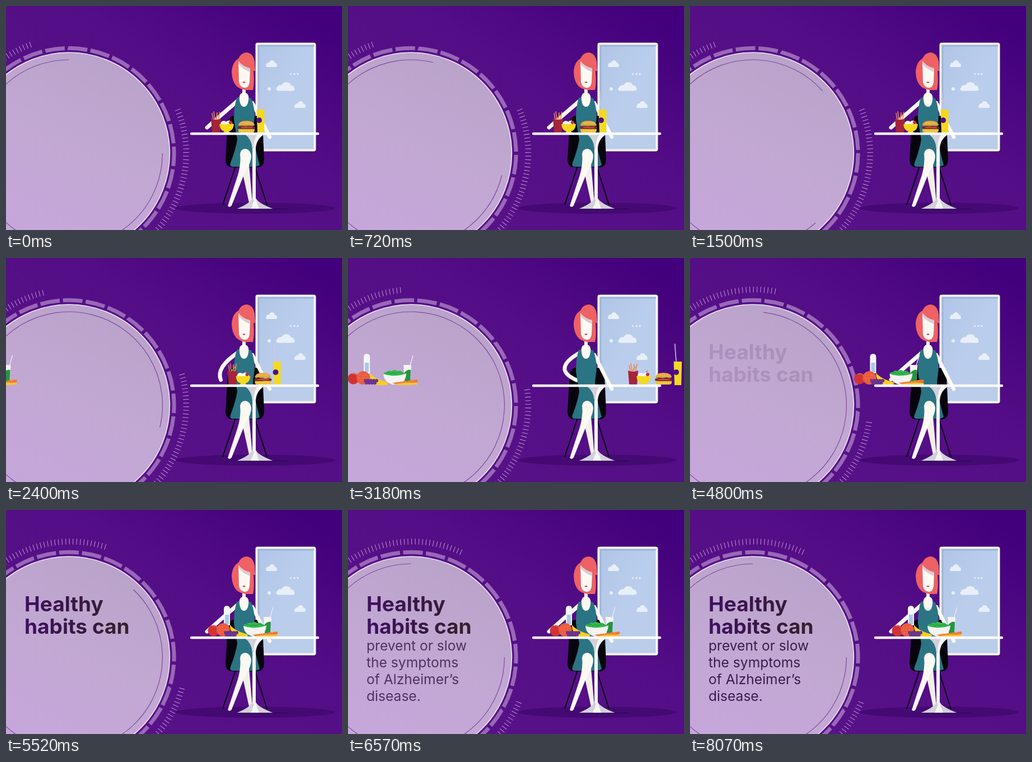
Recreate the animation shown at these times as an HTML page. Size 600 px wide and 400 px high, loop 8.1 s.

```html
<!DOCTYPE html>
<html lang="en">
<head>
<meta charset="utf-8">
<title>Healthy habits</title>
<style>
html, body { margin: 0; width: 100%; height: 100%; overflow: hidden; background: #541087; }
svg { display: block; width: 600px; height: 400px; }
text { font-family: Inter, "Open Sans", sans-serif; }
.title { font-weight: 700; font-size: 37.1px; }
.body { font-size: 24.6px; fill: #3c1c4f; }
</style>
</head>
<body>
<svg viewBox="0 0 600 400">
  <defs>
    <linearGradient id="bg" gradientUnits="userSpaceOnUse" x1="250" y1="400" x2="520" y2="0">
      <stop offset="0" stop-color="#581288"/><stop offset=".55" stop-color="#530d86"/><stop offset="1" stop-color="#43007c"/>
    </linearGradient>
    <linearGradient id="disc" x1=".3" y1="1" x2=".75" y2="0">
      <stop offset="0" stop-color="#c7a6dc"/><stop offset=".55" stop-color="#c1a8d2"/><stop offset="1" stop-color="#b9a2ca"/>
    </linearGradient>
    <linearGradient id="sky" x1="0" y1="0" x2="1" y2="1">
      <stop offset="0" stop-color="#b0c5e6"/><stop offset=".5" stop-color="#bacdec"/><stop offset="1" stop-color="#bacee9"/>
    </linearGradient>
    <linearGradient id="ink" gradientUnits="userSpaceOnUse" x1="34" y1="0" x2="218" y2="0">
      <stop offset="0" stop-color="#401062"/><stop offset=".5" stop-color="#381743"/><stop offset="1" stop-color="#35212b"/>
    </linearGradient>
    <g id="cloud" fill="#e9eff9">
      <circle cx="-5" cy="1" r="4"/><circle cx="1" cy="-2" r="5"/><circle cx="6" cy="1" r="3.5"/>
      <rect x="-10" y="0" width="20" height="5" rx="2.5"/>
    </g>
  </defs>

  <rect width="600" height="400" fill="url(#bg)"/>

  <g transform="translate(112.4 263)" fill="none">
    <circle r="180" fill="url(#disc)" stroke="#f1e6f7" stroke-width="1.6"/>
    <path id="arc" d="M167 0A167 167 0 1 1 0 -167" stroke="#814b9d" stroke-width="1.2"/>
    <circle id="dashes" r="187.700" stroke="#9868b7" stroke-width="7" pathLength="29" stroke-dasharray=".86 .14"/>
  </g>
  <g transform="translate(115 263)">
    <path id="ticks" stroke="#b58bcf" stroke-width="1.1"/>
  </g>

  <g fill="url(#ink)" id="title" class="title">
    <text x="33" y="180.500">Healthy</text><text x="33" y="220.500">habits can</text>
  </g>
  <g id="body" class="body">
    <text x="33" y="251">prevent or slow</text><text x="33" y="281">the symptoms</text>
    <text x="33" y="311">of Alzheimer’s</text><text x="33" y="341">disease.</text>
  </g>

  <ellipse cx="445" cy="361" rx="142" ry="10" fill="#440973"/>
  <path d="M413 362.500H502" stroke="#2c0550"/>

  <g id="window">
    <rect x="447.500" y="67.500" width="104" height="190" rx="2" fill="url(#sky)" stroke="#f5f5fa" stroke-width="4"/>
    <path d="M451 256V71H550" fill="none" stroke="#9db6da" stroke-width="3"/>
    <use href="#cloud" x="474" y="104"/>
    <use href="#cloud" transform="translate(499 145) scale(1.65 1.300)"/>
    <use href="#cloud" x="525" y="177"/>
    <g fill="#e9eff9">
      <circle cx="508.500" cy="121.500" r="1.500"/><circle cx="515" cy="121.500" r="1.700"/><circle cx="521" cy="121.500" r="1.700"/>
      <circle cx="470" cy="148" r="3"/>
    </g>
  </g>

  <g id="chair" fill="#08040d">
    <path d="M406 196H447Q456 197 458 207L461 273Q461 287 450 288H404Q392 288 392 274L396 207Q398 197 406 196Z"/>
    <path d="M410 286L387 355M444 286L466 355" stroke="#08040d" stroke-width="2"/>
  </g>

  <g id="woman">
    <path d="M440 173L471 234" stroke="#fcf9f3" stroke-width="6.500" stroke-linecap="round"/>
    <path id="arm" fill="none" stroke="#fcf9f3" stroke-width="7" stroke-linecap="round"/>
    <path d="M412 164Q425 160 438 165Q446 186 443 206Q440 222 442 234Q447 264 453 284Q447 288 438 287H404Q399 286 401 280Q410 257 413 238Q409 217 407 202Q407 180 412 164Z" fill="#2b7483"/>
    <path d="M422 138H428V155Q436 158 432 173Q430 180 425 180Q420 180 418 173Q414 158 422 155Z" fill="#fcf9f3"/>
    <path d="M422 296L433 272L440 351Q438 355 434 351Z" fill="#f4efe8"/>
    <path d="M418 264Q419 255 428 255Q437 257 438 268Q437 280 431 289Q425 300 421 311L403 356Q400 361 396 357L414 302Q420 281 418 264Z" fill="#fcf9f3"/>
    <path d="M415 94Q420 83 430 83Q441 84 444 99L445 116H442Q444 139 441 150H428Q420 149 414 145Q403 136 403 116Q405 99 415 94Z" fill="#ee6164"/>
    <path d="M415 99Q424 109 436 112L435 136Q434 146 426 146Q418 145 416 136Z" fill="#fcf9f3"/>
    <path d="M415 98Q424 109 436 111V118Q422 113 415 103Z" fill="#dccbd0"/>
    <path d="M422 136Q425 134.500 428 136Q425 139 422 136Z" fill="#c32c45"/>
  </g>

  <g id="pedestal">
    <path d="M427 229H461Q447 238 446 254V343Q450 352 476 362H413Q437 352 440 343V254Q439 238 427 229Z" fill="#f6f5f8"/>
    <path d="M427 229H449Q442 239 442 254L440 254Q439 238 427 229ZM440 343L443 347L437 362H413Q437 352 440 343ZM446 344L452 362H476Q450 352 446 344Z" fill="#d2d0d8"/>
  </g>

  <g id="fastFood">
    <path d="M370 204L368 191M373 204L371 188M376 204L377 190M379 204L382 189M371 204L380 194" stroke="#e68b55" stroke-width="1.600"/>
    <path d="M366 201Q375 205 384 201L382 226H368Z" fill="#a4243b"/>
    <path d="M397 210L400 201" stroke="#c32c45"/>
    <g fill="#fff8ee"><circle cx="389" cy="211" r="6"/><circle cx="398" cy="211" r="6.500"/></g>
    <circle cx="401" cy="208" r="3" fill="#c32c45"/>
    <path d="M381 211H407Q406 222 398 224L400 226H388L390 224Q382 222 381 211Z" fill="#f4d91c"/>
    <path d="M415 213Q416 205 429 205Q443 205 444 213Z" fill="#efa640"/>
    <path d="M415 219.500H444V222Q444 226 439 226H420Q415 226 415 222Z" fill="#eec22f"/>
    <rect x="414" y="215" width="31" height="4.500" rx="2" fill="#7c2431"/>
    <path d="M415 213H444L440 215L434 213.500L428 215.500L421 213.500L417 215Z" fill="#5da037"/>
    <path d="M420 217H440" stroke="#e83e39" stroke-width="2"/>
    <path d="M422 209H437M420 223H440" stroke="#fbe295" stroke-dasharray="1.500 3"/>
    <path d="M449.500 153L452 186" stroke="#d7c7e5" stroke-width="1.500"/>
    <path d="M447.500 185H462L461 227H449Z" fill="#f3d923"/>
    <circle cx="452" cy="204" r="5" fill="#491283"/>
  </g>

  <g id="freshFood">
    <path d="M389 206V177Q389 171 394.500 171Q400 171 400 177V206Z" fill="#f5f6fb"/>
    <path d="M391 187H398V204H391Z" fill="#a9c8e8"/>
    <path d="M400 205Q408 216 432 222L431 227H412Q399 219 400 205Z" fill="#f6cf20"/>
    <circle cx="370.500" cy="215.500" r="10" fill="#d03336"/>
    <path d="M368 207Q374 205 378 211" stroke="#e86a52" fill="none" stroke-width="1.500"/>
    <circle cx="388" cy="214" r="12" fill="#ea5c40"/>
    <path d="M381 209H396M380 214H397M382 219H395" stroke="#f58b5b" stroke-width="1.500" stroke-dasharray="1.500 4"/>
    <path id="grapes" fill="#69358f"/>
    <path d="M460 191H474L472 220H462Z" fill="#f4f5f3"/>
    <path d="M462 204Q468 198 473 200L472 220H462Z" fill="#269440"/>
    <path d="M471 194L477 174" stroke="#eee5f5" stroke-width="1.400"/>
    <path d="M424 209Q424 203 430 204Q433 199 438 202Q444 198 449 202Q455 200 458 204Q464 204 462 211L445 214Z" fill="#34b94b"/>
    <path d="M424 207Q434 211 445 210Q456 210 465 206Q464 223 449 226H441Q425 222 424 207Z" fill="#f3f3f2"/>
    <path d="M428 206Q433 202 437 207Q442 203 446 207Q452 202 459 206" fill="none" stroke="#28a845" stroke-width="2"/>
    <path d="M440 223L484 217Q487 219 484 222L448 226Z" fill="#f37536"/>
    <path d="M442 226Q460 221 485 223V226Q460 228 442 226Z" fill="#f9c52b"/>
    <path d="M457 221.500L481 219" stroke="#ffc06b" stroke-dasharray="2 4"/>
  </g>

  <path d="M331 228H557" stroke="#fdfcff" stroke-width="4.400" stroke-linecap="round"/>
</svg>

<script>
const LOOP = 8100;
const $ = id => document.getElementById(id);
const clamp = x => Math.min(1, Math.max(0, x));
const ramp = (t, from, to) => clamp((t - from) / (to - from));

// Smooth curve through [time, value] keys, flat at both ends and at turning points.
function track(keys) {
  const slope = i => (keys[i + 1][1] - keys[i][1]) / (keys[i + 1][0] - keys[i][0]);
  const tangents = keys.map((key, i) => {
    if (i === 0 || i === keys.length - 1 || slope(i - 1) * slope(i) <= 0) return 0;
    return (slope(i - 1) + slope(i)) / 2;
  });
  return t => {
    if (t <= keys[0][0]) return keys[0][1];
    const i = keys.findIndex(key => key[0] >= t) - 1;
    if (i < 0) return keys[keys.length - 1][1];
    const [t0, a] = keys[i], [t1, b] = keys[i + 1];
    const d = t1 - t0, u = (t - t0) / d, v = 1 - u;
    return v * v * (1 + 2 * u) * a + u * u * (3 - 2 * u) * b
      + d * u * v * (v * tangents[i] - u * tangents[i + 1]);
  };
}

const arcTurn = track([[0, 0], [1500, 48], [3180, 161], [4080, 233], [5520, 313.5], [6570, 360]]);
const dashTurn = track([[0, 0], [1500, 16], [3180, 53.7], [4080, 78], [5520, 107], [6570, 120.5]]);
const slide = track([[1900, 0], [3180, 134], [4080, 282], [5400, 495]]);

// Control point and hand of the sweeping arm.
const armTimes = [1800, 3000, 3250, 4080, 4800];
const arm = [
  [386, 363, 363, 384, 386],
  [193, 198, 198, 180, 193],
  [359, 408, 408, 376, 359],
  [217, 218, 218, 217, 217]
].map(values => track(values.map((v, i) => [armTimes[i], v])));

function buildTicks() {
  let d = "";
  for (let deg = -22; deg <= 250.2; deg += 1.8) {
    const c = Math.cos(deg * Math.PI / 180), s = Math.sin(deg * Math.PI / 180);
    d += `M${201.5 * c} ${201.5 * s}L${212 * c} ${212 * s}`;
  }
  $("ticks").setAttribute("d", d);
}

function buildGrapes() {
  let d = "";
  for (let i = 0; i < 9; i++) {
    const x = 392 + (i % 5) * 5 + (i > 4 ? 2 : 0), y = i > 4 ? 223 : 219;
    d += `M${x - 3} ${y}a3 3 0 1 0 6 0a3 3 0 1 0 -6 0`;
  }
  $("grapes").setAttribute("d", d);
}

const rotate = (id, deg) => $(id).setAttribute("transform", `rotate(${deg})`);
const shift = (id, x) => $(id).setAttribute("transform", `translate(${x} 0)`);

function draw(t) {
  const x = slide(t);
  rotate("arc", arcTurn(t));
  rotate("dashes", dashTurn(t) - 90.6);
  rotate("ticks", 45 * ramp(t, 1750, 6250));
  shift("fastFood", x);
  shift("freshFood", x - 495);
  const [cx, cy, hx, hy] = arm.map(f => f(t));
  $("arm").setAttribute("d", `M414 169Q${cx} ${cy} ${hx} ${hy}`);
  $("title").setAttribute("opacity", ramp(t, 4700, 5400));
  $("body").setAttribute("opacity", ramp(t, 5850, 6700));
}

function frame() {
  draw(performance.now() % LOOP);
  requestAnimationFrame(frame);
}

buildTicks();
buildGrapes();
frame();
</script>
</body>
</html>
```
